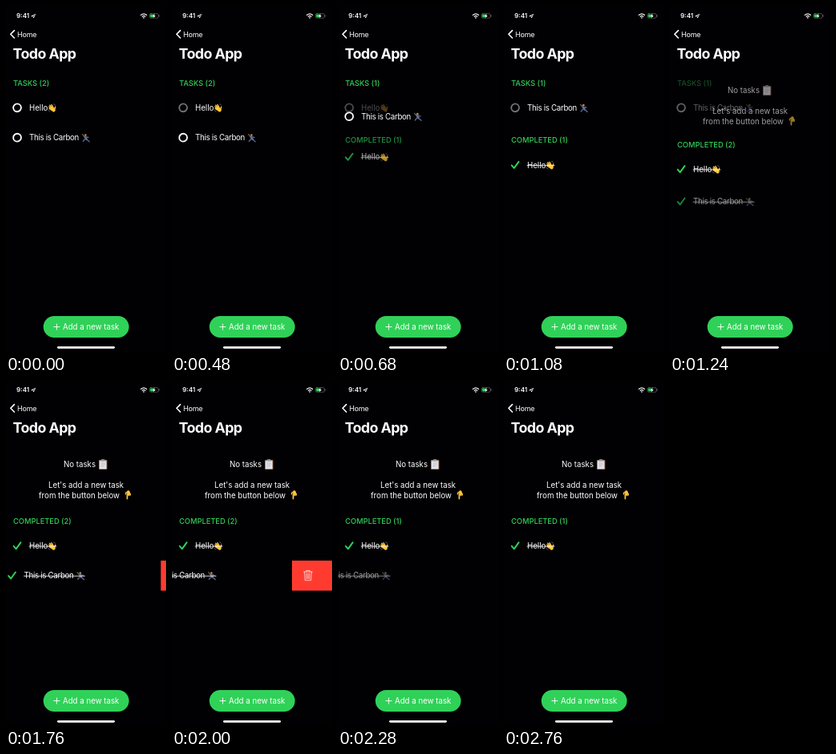
Write an HTML page that moves like this. It is 200 by 433 pixels and loops after 2.8 s.

```html
<!DOCTYPE html>
<html lang="en">
<head>
<meta charset="utf-8">
<title>Todo App</title>
<style>
  html, body { margin: 0; height: 100%; overflow: hidden; background: #010003; }
  svg { display: block; width: 200px; height: 433px; }
  text { font: 9.7px Inter, Roboto, sans-serif; fill: #fff; }
  .head { font-size: 9.3px; font-weight: 500; fill: #30d158; }
  .title { font-size: 17.8px; font-weight: 700; letter-spacing: -.032em; }
  .clock { font-size: 8px; font-weight: 600; }
  .nav { font-size: 9px; letter-spacing: -.025em; }
  .tight { letter-spacing: -.03em; }
  .line { fill: none; stroke: #fff; stroke-linecap: round; stroke-linejoin: round; }
</style>
</head>
<body>
<svg viewBox="0 0 200 433">
  <defs>
    <g id="wave" fill="none" stroke="#ffc83d" stroke-linecap="round" stroke-width="1.5">
      <path d="M5.2 7 1.9 4.2M5.8 6 2.8 2.4M7 5.4 4.9 1.8M5.2 8.6 2 6.4M8.8 7.6 9.6 4.4"/>
      <path d="M6.6 7.4 7.6 8.6" stroke-width="4.2"/>
      <path d="M7.6 .9Q9.2 1.2 9.8 2.6M.9 8.4Q1.4 10 3 10.4" stroke="#8a9299" stroke-width=".6"/>
    </g>
    <g id="climber" fill="none" stroke="#5d6a80" stroke-linecap="round" stroke-width="1.4">
      <path d="M1.2 1.2 3.2 4.2" stroke="#b58a4c" stroke-width="1"/>
      <circle cx="4.8" cy="2.2" r="1.4" fill="#b58a4c" stroke="none"/>
      <path d="M4.6 4.6 6 7.2" stroke="#5f6fae" stroke-width="2.8"/>
      <path d="M6 4.6 8.4 5M4 7.4 1.8 10M6.6 7.8 9.6 10.4"/>
    </g>
    <g id="board">
      <rect x=".5" y="1" width="10.4" height="12" rx="1" fill="#a47a66"/>
      <rect x="1.5" y="2.3" width="8.4" height="9.8" fill="#e4e3ec"/>
      <rect x="3.4" y=".2" width="4.6" height="2.6" rx=".8" fill="#9aa3ad"/>
      <path d="M3 5H8.4M3 7H8.4M3 9H7" stroke="#a3a9b5" stroke-width=".6"/>
    </g>
    <g id="down" fill="none" stroke="#ffc83d" stroke-linecap="round">
      <path d="M3 5.2V10.8" stroke-width="1.7"/>
      <path d="M4.4 2.4 4.8 4.6" stroke-width="3.8"/>
      <path d="M5 5V6.8M6.8 4.4V6.2M1.8 2.8 1 5" stroke-width="1.5"/>
      <path d="M4 5.2V7.4M5.9 5V7" stroke="#d8932a" stroke-width=".4"/>
    </g>
    <circle id="ring" class="line" cx="14" r="4.9" stroke-width="1.9"/>
    <path id="check" class="line" d="M9.6 .4 12.6 3.8 18.4-4.2" style="stroke:#30d158" stroke-width="2"/>
    <g id="hello"><text x="29" y="3.5">Hello</text><use href="#wave" x="52" y="-5.5"/></g>
    <g id="carbon"><text class="tight" x="29" y="3.5">This is Carbon</text><use href="#climber" x="94.5" y="-5.3"/></g>
  </defs>

  <text class="clock" x="13" y="15.4">9:41</text>
  <path class="line" d="M32 12.6 36.6 10.3 34.4 15 34.1 12.8Z" stroke-width=".8"/>
  <g class="line" stroke-width="1.2">
    <path d="M168.7 11.3Q172.2 8.5 175.7 11.3M170.3 13.1Q172.2 11.6 174.1 13.1"/>
    <circle cx="172.2" cy="14.7" r=".3"/>
  </g>
  <rect class="line" x="179.4" y="9.6" width="11" height="5.6" rx="1.6" stroke-width=".6" opacity=".45"/>
  <rect x="180.3" y="10.5" width="4.8" height="3.8" rx=".8" fill="#30d158"/>
  <path d="M185.8 9.6 183.2 12.8H184.8L184.2 15.3 187 12H185.3Z" fill="#fff"/>
  <path d="M191.3 11.5V13.3" class="line" stroke-width=".7" opacity=".45"/>
  <path class="line" d="M10.4 30.6 5.8 35.3 10.4 40" stroke-width="1.6"/>
  <text class="nav" x="14" y="38.5">Home</text>
  <text class="title" x="8.6" y="66.2">Todo App</text>

  <text id="tasksHead" class="head" x="9" y="100.3"></text>
  <g id="todoHello"><use id="ringHello" href="#ring"/><use href="#hello"/></g>
  <g id="todoCarbon"><use id="ringCarbon" href="#ring"/><use href="#carbon"/></g>

  <g id="empty">
    <text x="72" y="109.4">No tasks</text><use href="#board" x="115.5" y="99"/>
    <text x="53" y="135">Let's add a new task</text>
    <text x="41" y="148">from the button below</text><use href="#down" x="148.5" y="137.8"/>
  </g>

  <text id="doneHead" class="head" x="9"></text>
  <g id="doneHello"><use href="#check"/><use href="#hello"/><path class="line" d="M29 .6H63" stroke-width=".8"/></g>
  <g id="doneCarbon"><use href="#check"/><use href="#carbon"/><path class="line" d="M29 .6H105" stroke-width=".8"/></g>

  <g id="trash">
    <rect y="226" width="60" height="37.6" fill="#ff3b30"/>
    <g class="line" stroke-width=".7">
      <path d="M14.6 240H25.4M17.8 239.8V238.4H22.2V239.8M15.6 240.2 16.3 250.7H23.7L24.4 240.2"/>
      <path d="M18 242.2 18.2 248.7M20 242.2V248.7M22 242.2 21.8 248.7"/>
    </g>
  </g>

  <rect x="46.7" y="388" width="107" height="27" rx="13.5" fill="#30d158"/>
  <path class="line" d="M59.8 401.5H67M63.4 397.9V405.1" stroke-width=".9"/>
  <text x="71" y="405">Add a new task</text>
  <rect x="64" y="426" width="72" height="2.7" rx="1.35" fill="#fff"/>
</svg>
<script>
const LOOP = 2800, MOVE = 260;
const FIRST_DONE = 514, SECOND_DONE = 1090, DELETE = 2170;
const TOP_ROW = 127.3, NEXT_ROW = 164.7;
const $ = id => document.getElementById(id);
const mix = (a, b, p) => a + (b - a) * p;

function ease(t, start, length = MOVE) {
  const p = Math.min(1, Math.max(0, (t - start) / length));
  return p * p * (3 - 2 * p);
}

function place(id, x, y, opacity) {
  $(id).setAttribute('transform', `translate(${x} ${y})`);
  $(id).setAttribute('opacity', opacity);
}

// Ring dims under the finger and recovers after release
const press = (t, release) => 1 - .55 * (ease(t, release - 130, 80) - ease(t, release, 120));

function draw(t) {
  const first = ease(t, FIRST_DONE), second = ease(t, SECOND_DONE), gone = ease(t, DELETE);
  const swipe = 50 * ease(t, 1700, 270) - 10 * ease(t, 2010, 110);

  $('tasksHead').textContent = `TASKS (${t < FIRST_DONE ? 2 : 1})`;
  place('tasksHead', 0, 0, 1 - second);
  place('todoHello', 0, TOP_ROW, 1 - first);
  place('todoCarbon', 0, mix(NEXT_ROW, TOP_ROW, first), 1 - second);
  $('ringHello').setAttribute('opacity', press(t, FIRST_DONE));
  $('ringCarbon').setAttribute('opacity', press(t, SECOND_DONE));

  place('empty', 0, 0, second);
  $('doneHead').textContent = `COMPLETED (${t >= SECOND_DONE && t < DELETE ? 2 : 1})`;
  place('doneHead', 0, mix(171.4, 179.9, second), first);
  place('doneHello', 0, mix(NEXT_ROW, 199, first) + 8.5 * second, first);
  place('doneCarbon', -swipe, 244.7, second * (1 - gone));
  place('trash', 200 - swipe, 0, t < DELETE ? 1 : 0);
}

(function frame() {
  draw(performance.now() % LOOP);
  requestAnimationFrame(frame);
})();
</script>
</body>
</html>
```
